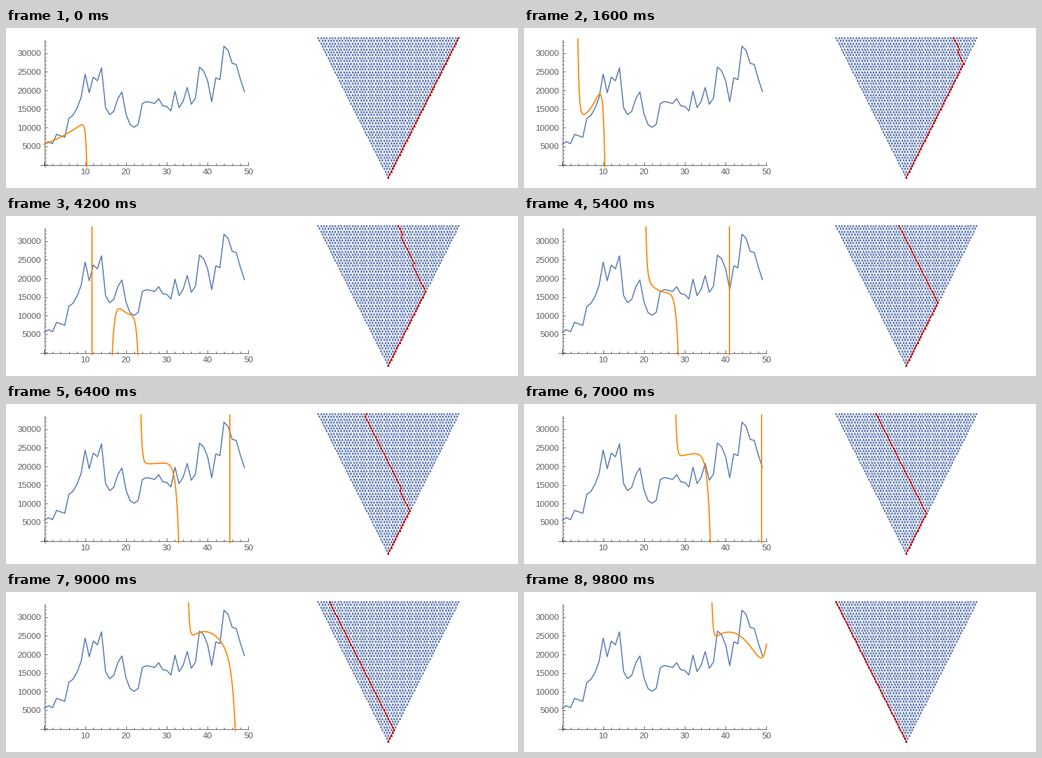
Animation, 780 px wide and 246 px high, one loop 10000 ms. Source, as a matplotlib script:

```python
import numpy as np
import matplotlib.pyplot as plt
from matplotlib.animation import FuncAnimation
from matplotlib.collections import LineCollection
from matplotlib.patches import Rectangle

W, H, DPI = 780, 246, 100
PT = 72 / DPI
N = 50
BLUE, ORANGE, GREY = "#5e81b5", "#ff8400", "#606060"
TOP = 34000

# series values in hundreds
SERIES = 100 * np.array([
    56, 62, 57, 82, 78, 74, 125, 133, 152, 181, 244, 194, 236, 226, 261, 154,
    135, 144, 178, 196, 137, 108, 101, 109, 165, 170, 168, 165, 178, 159, 157,
    145, 198, 154, 171, 208, 163, 179, 263, 253, 226, 170, 234, 229, 319, 308,
    273, 270, 231, 197])

# key poses: step, window start and end, height at its start, middle and end
POSES = np.array([
    (0, -3, 10.4, 4700, 7300, 12000),
    (8, 3.8, 10.4, 13000, 15500, 24000),
    (15, 9.5, 15.35, 22400, 20600, 18500),
    (21, 16.65, 22.9, 19000, 11200, 13000),
    (32, 23.65, 32.9, 20700, 20900, 21600),
    (39, 33.3, 40.7, 24500, 26900, 26700),
    (49, 36.65, 50.8, 23500, 24800, 11500)])

# triangle nodes (row, steps from the right edge) where a route bends left
BENDS = {(4, 4), (3, 18), (13, 9), (0, 32), (26, 7),
         (0, 39), (1, 39), (11, 30), (19, 23)}


def px(x):
    return 58.4 + 6.22 * np.asarray(x, float)


def py(y):
    return 210.4 - 0.005717 * np.asarray(y, float)


def node(row, d):
    return 689.2 - 4.367 * d - 2.1835 * row, 15.1 + 4.378 * row


def from_below(k):
    return k % 18 < 6


def pose(k):
    return [np.interp(k, POSES[:, 0], col) for col in POSES.T[1:]]


def curve(k, x):
    """A calm stretch between two edges, running off steeply past them."""
    l, r, a, mid, b = pose(k)
    u = np.clip(2 * (x - l) / (r - l) - 1, -1.2, 1.2)
    y = mid + (b - a) / 2 * u + ((a + b) / 2 - mid) * u ** 2
    soft_l = .7 if from_below(k) else .3
    soft_r = .3 + .012 * k
    left = (0 if from_below(k) else TOP) - a
    right = (TOP if k > 46 else 0) - b
    y += left * np.exp(np.clip((l - x) / soft_l, -50, 12))
    y += right * np.exp(np.clip((x - r) / soft_r, -50, 12))
    return np.clip(y, -1e5, 2e5)


def crossing(k):
    """Where the curve shoots through the whole plot once more."""
    l, r = pose(k)[:2]
    if from_below(k):
        return l - .35 * (k - 6.6)
    return r + 12.6 if k > 24 else -1


def route(k):
    d, pts = k, [node(0, k)]
    for row in range(N - 1):
        if d > 0 and (row, d) not in BENDS:
            d -= 1
        pts.append(node(row + 1, d))
    return np.array(pts)


fig = plt.figure(figsize=(W / DPI, H / DPI), dpi=DPI, facecolor="white")
ax = fig.add_axes([0, 0, 1, 1])
ax.set_xlim(0, W)
ax.set_ylim(H, 0)
ax.axis("off")


def rule(x, y):
    ax.plot(x, y, color=GREY, lw=PT, snap=True, solid_capstyle="butt", zorder=1)


def draw_axes():
    rule([52, 369.5], [210.5, 210.5])
    rule([58.5, 58.5], [18, 214])
    font = dict(family="Liberation Sans", size=13 * PT, color=GREY)
    for v in range(0, 51, 2):
        major = v % 10 == 0
        rule([px(v)] * 2, [210.5, 206 if major else 207.5])
        if major and v:
            ax.text(px(v), 220.8, str(v), ha="center", va="center_baseline",
                    **font)
    for v in range(0, TOP, 1000):
        major = v % 5000 == 0
        rule([58.5, 62.5 if major else 61], [py(v)] * 2)
        if major and v:
            ax.text(53.5, py(v), str(v), ha="right", va="center_baseline",
                    **font)


def draw_triangle():
    segs = []
    for j in range(N):
        segs.append([node(0, j), node(j, 0)])
        segs.append([node(0, j), node(N - 1 - j, j)])
    ax.add_collection(LineCollection(segs, colors=BLUE, alpha=.65,
                                     linewidths=.75 * PT, zorder=1))
    dots = np.array([node(r, d) for r in range(N) for d in range(N - r)])
    ax.plot(*dots.T, "o", ms=2.8 * PT, mew=0, color="#5873b3", zorder=2)


draw_axes()
draw_triangle()
ax.plot(px(range(N)), py(SERIES), color=BLUE, lw=1.7 * PT, zorder=2)

window = Rectangle((57, 15.5), 313, 198.5, transform=ax.transData)
fit, = ax.plot([], [], color=ORANGE, lw=1.8 * PT, zorder=3)
cross, = ax.plot([], [], color=ORANGE, lw=1.8 * PT, zorder=3)
for line in (fit, cross):
    line.set_clip_path(window)
path, = ax.plot([], [], "-o", color="#e00000", lw=1.3 * PT, ms=2.9 * PT,
                mfc="#b00000", mew=0, zorder=4)
XS = np.linspace(0, 50, 2501)


def update(k):
    fit.set_data(px(XS), py(curve(k, XS)))
    cross.set_data([px(crossing(k))] * 2, [10, 220])
    path.set_data(*route(k).T)
    return fit, cross, path


anim = FuncAnimation(fig, update, frames=N, interval=200, repeat=True,
                     repeat_delay=0, init_func=lambda: update(0))
plt.show()
```
